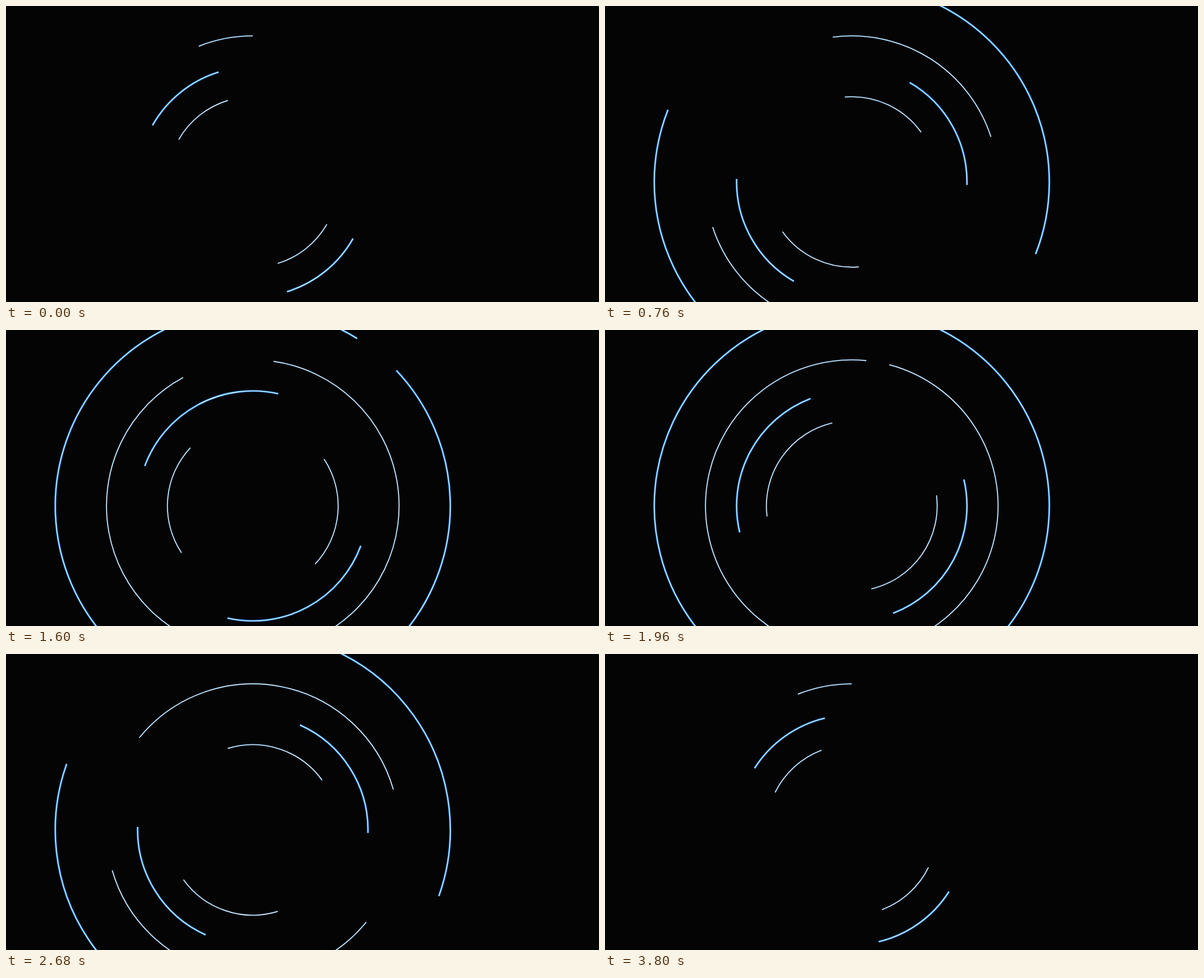
Animation, 1058 px wide and 529 px high, one loop 3840 ms. Source, as an HTML page:

```html
<!DOCTYPE html>
<html lang="en">
<head>
<meta charset="utf-8">
<title>Rotating arcs</title>
<style>
  html, body { margin: 0; width: 100%; height: 100%; overflow: hidden; background: #040404; }
  svg { display: block; width: 100%; height: 100%; }
  path { fill: none; }
</style>
</head>
<body>
<svg id="stage" viewBox="0 0 1058 529"></svg>
<script>
const LOOP = 3840, STEP = 40, LAST = LOOP - STEP, PEAK = 2080;
const CX = 440.3, CY = 314.4;

// Stroke layers from halo to core: [colour, width, opacity]
const THICK = [['#0b5fb8', 4.4, 0.5], ['#2f9ff5', 2.9, 0.95], ['#e2f5ff', 1.3, 1]];
const THIN = [['#2187d6', 2.6, 0.55], ['#eef9ff', 1.4, 1]];

// end: leading angle in degrees clockwise from the top; turn: duration of one revolution
const rings = [
  { r: 352.4, layers: THICK, end: -0.33, min: 21.6, max: 180, turn: LAST, reverse: true },
  { r: 261, layers: THIN, end: 0, min: 21.6, max: 180, turn: LAST },
  { r: 205.5, layers: THICK, end: -17.28, min: 43.2, max: 86.4, turn: LOOP, reverse: true },
  { r: 152.3, layers: THIN, end: -16.96, min: 43.2, max: 86.4, turn: LOOP }
];

const stage = document.getElementById('stage');

for (const ring of rings) {
  ring.paths = ring.layers.map(([stroke, width, opacity]) => {
    const path = document.createElementNS('http://www.w3.org/2000/svg', 'path');
    path.setAttribute('stroke', stroke);
    path.setAttribute('stroke-width', width);
    path.setAttribute('stroke-opacity', opacity);
    stage.append(path);
    return path;
  });
}

function point(r, deg) {
  const a = deg * Math.PI / 180;
  return `${(CX + r * Math.sin(a)).toFixed(3)} ${(CY - r * Math.cos(a)).toFixed(3)}`;
}

function arc(r, from, to) {
  return `M${point(r, from)}A${r} ${r} 0 0 1 ${point(r, to)}`;
}

// Linear growth up to PEAK, then linear shrinking that rests on the last step
function sweep({ min, max }, t) {
  const k = t < PEAK ? t / PEAK : Math.max(0, (LAST - t) / (LAST - PEAK));
  return min + (max - min) * k;
}

function draw(time) {
  for (const ring of rings) {
    const t = ring.reverse ? LOOP - time : time;
    const end = ring.end + 360 * Math.min(1, t / ring.turn);
    const start = end - sweep(ring, t);
    const d = arc(ring.r, start, end) + arc(ring.r, start + 180, end + 180);
    ring.paths.forEach(path => path.setAttribute('d', d));
  }
}

const begin = performance.now();

function tick() {
  const t = (performance.now() - begin) % LOOP;
  draw(Math.floor(t / STEP) * STEP);
  requestAnimationFrame(tick);
}

draw(0);
requestAnimationFrame(tick);
</script>
</body>
</html>
```
